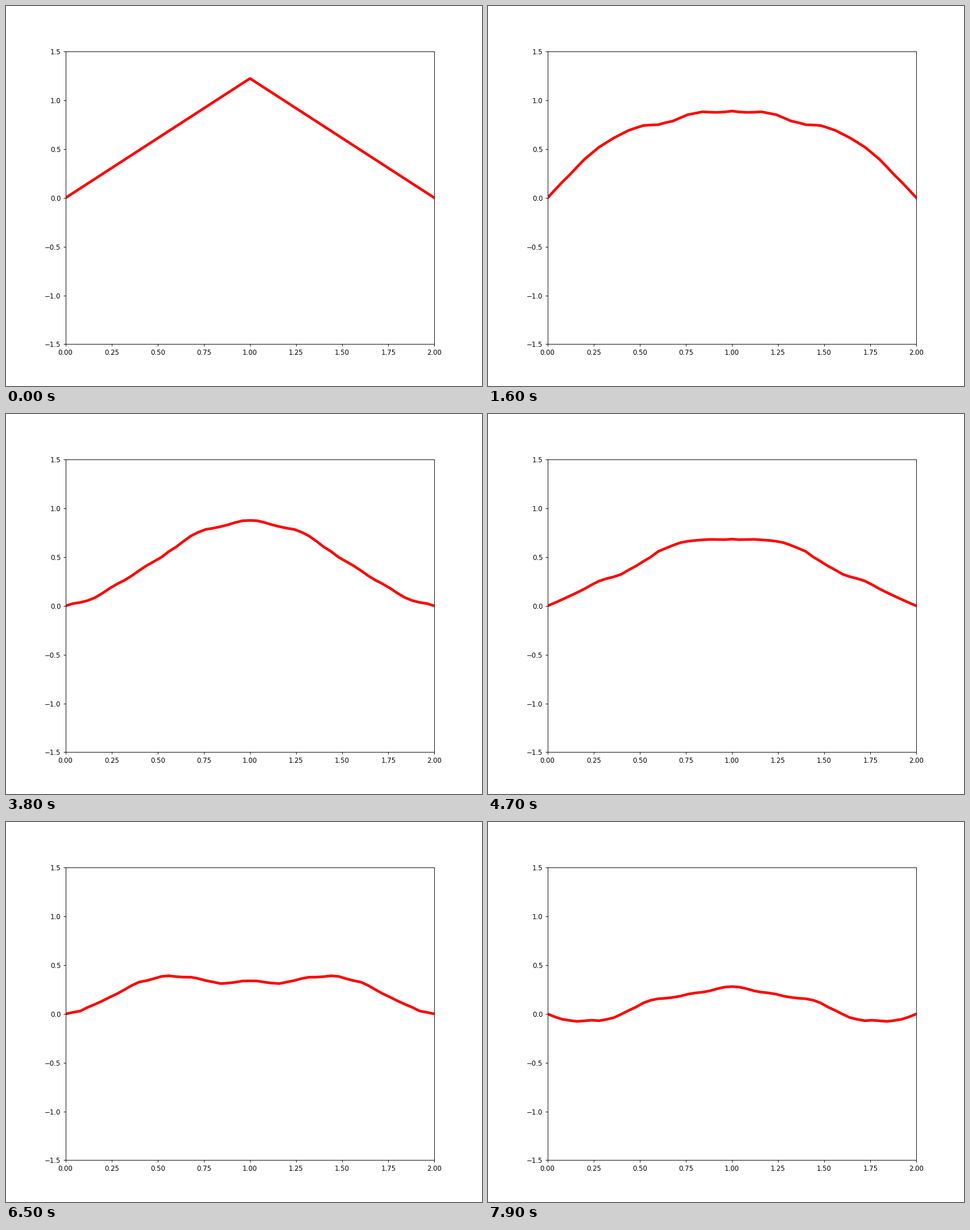
Recreate the animation shown at these times as a matplotlib script. Size 837 px wide and 669 px high, loop 8 s.

```python
import numpy as np
import matplotlib.pyplot as plt
from matplotlib.animation import FuncAnimation

FRAMES = 80
INTERVAL = 100          # ms
DPI = 83.7
LENGTH = 2.0
STEPS = 50              # grid cells
DT = 10 / 699           # time step per frame

x = np.linspace(0, LENGTH, STEPS + 1)
dx = x[1] - x[0]

# Normalised triangle expanded in the box's sine modes
psi0 = np.sqrt(1.5) * (1 - np.abs(x - 1))
k = np.arange(1, STEPS) * np.pi / LENGTH
energy = k ** 2 / 2
basis = np.sin(np.outer(x, k)) * np.sqrt(2 / LENGTH)
coef = basis.T @ psi0 * dx


def real_part(t):
    return basis @ (coef * np.cos(energy * t))


fig, ax = plt.subplots(figsize=(837.01 / DPI, 669.01 / DPI), dpi=DPI)
ax.set_xlim(0, LENGTH)
ax.set_ylim(-1.5, 1.5)
line, = ax.plot(x, real_part(0), color="red", lw=4)


def update(i):
    line.set_ydata(real_part(i * DT))
    return line,


anim = FuncAnimation(fig, update, frames=FRAMES, interval=INTERVAL,
                     repeat=True, repeat_delay=0)
plt.show()
```
